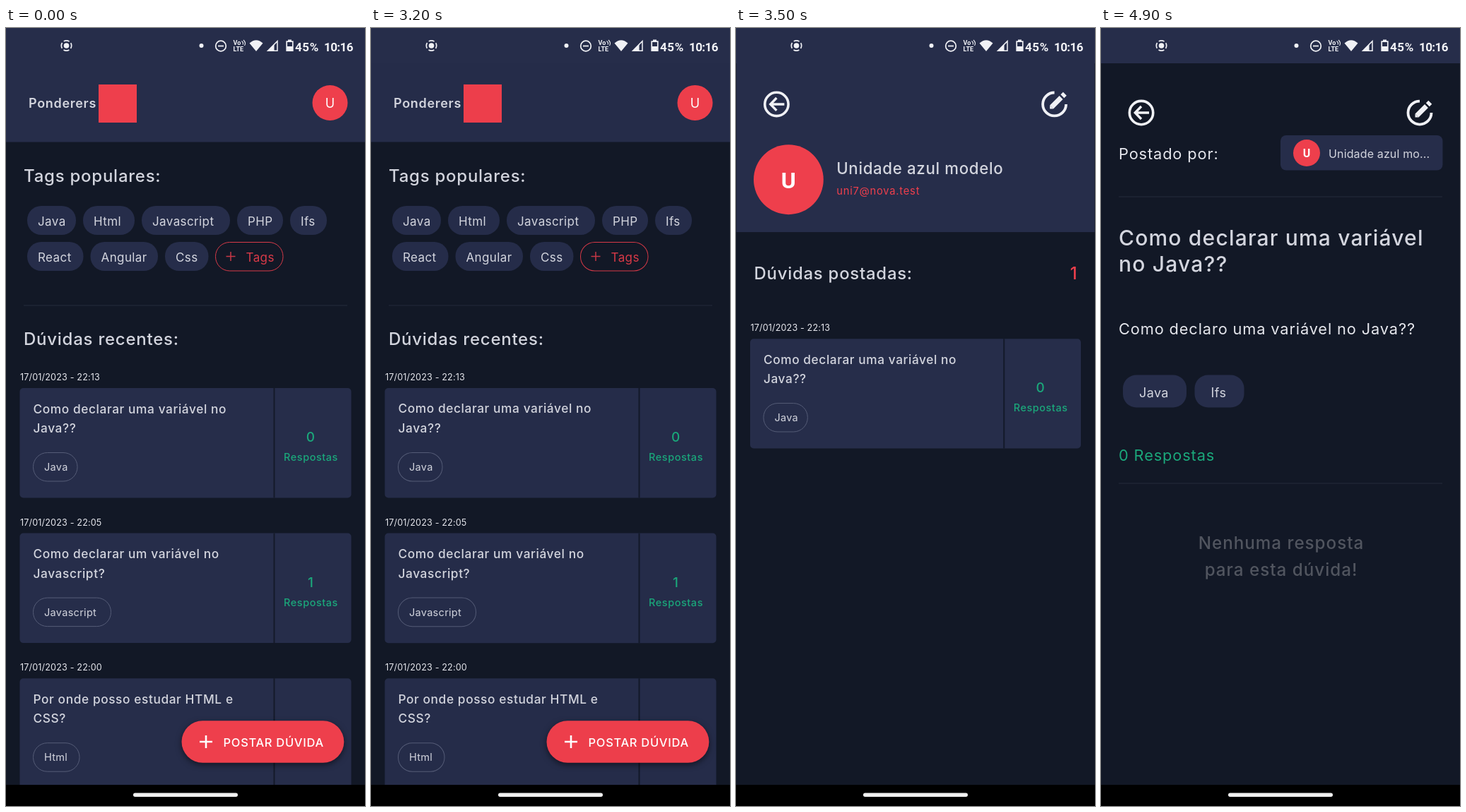
An HTML page that plays this animation: 508 by 1102 pixels, repeating every 5000 ms.

```html
<!DOCTYPE html>
<html lang="pt">
<head>
<meta charset="utf-8">
<title>Dúvidas</title>
<style>
html, body { margin: 0; width: 100%; height: 100%; overflow: hidden; background: #121826; }
svg { display: block; width: 508px; height: 1102px; font-family: Inter, "Open Sans", sans-serif; }
text { fill: #d3d5de; white-space: pre; }
.head { font-size: 24px; font-weight: 500; letter-spacing: .75px; }
.empty { font-size: 24.2px; font-weight: 500; letter-spacing: 1px; fill: #51555f; }
.brand { font-size: 18px; font-weight: 600; letter-spacing: .7px; }
.tag { font-size: 17px; letter-spacing: .4px; }
.big { font-size: 18px; letter-spacing: .4px; }
.date { font-size: 12.6px; letter-spacing: .15px; fill: #e6e7ed; }
.ask { font-size: 17.3px; font-weight: 500; letter-spacing: .6px; }
.small { font-size: 14.5px; letter-spacing: .3px; }
.count { font-size: 19px; font-weight: 500; fill: #1ba87b; }
.reply { font-size: 14.4px; font-weight: 500; letter-spacing: .6px; fill: #1ba87b; }
.post { font-size: 16.5px; font-weight: 500; letter-spacing: .7px; fill: #fff; }
.name { font-size: 22.3px; font-weight: 500; letter-spacing: .65px; }
.mail { font-size: 14.8px; letter-spacing: .75px; fill: #ee3f4c; }
.body { font-size: 21.8px; letter-spacing: .87px; fill: #e6e7ed; }
.title { font-size: 30px; font-weight: 500; letter-spacing: 1.2px; }
.chip { font-size: 16px; letter-spacing: .15px; }
.bar { font: 600 17px Roboto, sans-serif; fill: #f2f3f7; }
.red { fill: #ee3f4c; }
.green { fill: #1ba87b; }
.white { fill: #fff; }
#fab { filter: drop-shadow(0 3px 4px rgba(0, 0, 0, .5)); }
</style>
</head>
<body>
<svg id="stage" viewBox="0 0 508 1102"></svg>
<script>
const BG = '#121826', PANEL = '#262d4a', RED = '#ee3f4c', LIGHT = '#f0f1f5', LINE = '#252c3c';
const NAME = 'Unidade azul modelo';
const LOOP = 5000;

const text = (x, y, cls, s, more = '') => `<text x="${x}" y="${y}" class="${cls}" ${more}>${s}</text>`;
const mid = (x, y, cls, s, more = '') => text(x, y, cls, s, 'text-anchor="middle" ' + more);
const rect = (x, y, w, h, fill, r = 0, more = '') =>
  `<rect x="${x}" y="${y}" width="${w}" height="${h}" rx="${r}" fill="${fill}" ${more}/>`;
const circle = (x, y, r, fill, more = '') => `<circle cx="${x}" cy="${y}" r="${r}" fill="${fill}" ${more}/>`;
const path = (d, color, w, more = '') =>
  `<path d="${d}" fill="none" stroke="${color}" stroke-width="${w}" ${more}/>`;
const rule = y => rect(25, y, 458, 1, LINE);
const plus = (x, y, r, color, w) => path(`M${x - r} ${y}h${2 * r}M${x} ${y - r}v${2 * r}`, color, w);
const page = () => rect(0, 0, 508, 1102, BG);

function tag(x, y, w, label) {
  return rect(x, y, w, 41, PANEL, 20) + text(x + 15, y + 28, 'tag', label);
}

function card(y, date, lines, label, w, count) {
  return text(20, y - 11, 'date', date) +
    rect(19.5, y, 469, 155.5, PANEL, 5) +
    rect(378.5, y, 2, 155.5, '#141a2a') +
    lines.map((s, i) => text(38.5, y + 35.5 + i * 27.7, 'ask', s)).join('') +
    rect(38.5, y + 91.5, w, 40.5, PANEL, 20, 'stroke="#555c77" stroke-width="1"') +
    text(54, y + 117, 'small', label) +
    mid(431, y + 76, 'count', count) +
    mid(431.5, y + 103, 'reply', 'Respostas');
}

function icons(y) {
  return circle(57, y, 16.7, 'none', `stroke="${LIGHT}" stroke-width="3.6"`) +
    path(`M68 ${y}H49M57 ${y - 9}L48.3 ${y}L57 ${y + 9}`, LIGHT, 3.4) +
    path(`M451 ${y - 16.5}A16.5 16.5 0 1 0 467.5 ${y}`, LIGHT, 3.8) +
    path(`M447 ${y + 4}L460.5 ${y - 9.5}M462.3 ${y - 11.3}L465.8 ${y - 14.8}`, LIGHT, 7) +
    `<path d="M444.5 ${y + 6.5}v-5l5 5z" fill="${LIGHT}"/>`;
}

function initial(x, y, r, size) {
  return circle(x, y, r, RED) +
    mid(x, y + size * .37, 'white', 'U', `style="font:700 ${size}px Roboto,sans-serif"`);
}

const javaCard = y => card(y, '17/01/2023 - 22:13', ['Como declarar uma variável no', 'Java??'], 'Java', 62.5, 0);

const home = page() + rect(0, 0, 508, 161.5, PANEL) +
  text(32, 113, 'brand', 'Ponderers') +
  rect(131, 80, 54, 54, RED) +
  circle(458.5, 106, 25, RED) + mid(458.5, 113, 'white', 'U', 'font-size="18"') +
  text(25, 218, 'head', 'Tags populares:') +
  [[30, 252, 69, 'Java'], [109, 252, 73, 'Html'], [192, 252, 125, 'Javascript'], [327, 252, 65, 'PHP'],
   [402, 252, 52, 'Ifs'], [30, 303, 79.5, 'React'], [119.5, 303, 95.5, 'Angular'], [225, 303, 61.5, 'Css']]
    .map(a => tag(...a)).join('') +
  rect(296.5, 303.5, 95.5, 40.5, 'none', 20, 'stroke="#d83a48" stroke-width="1"') +
  plus(318, 323.5, 6.5, '#c83847', 1.5) + text(339.5, 331, 'tag', 'Tags', 'style="fill:#d83a48"') +
  rule(392.5) +
  text(25, 449, 'head', 'Dúvidas recentes:') +
  javaCard(510) +
  card(715.6, '17/01/2023 - 22:05', ['Como declarar um variável no', 'Javascript?'], 'Javascript', 110, 1) +
  card(921.2, '17/01/2023 - 22:00', ['Por onde posso estudar HTML e', 'CSS?'], 'Html', 65.5, 1) +
  `<g id="fab">${rect(248.5, 981.3, 229.8, 59.4, RED, 29.7)}</g>` +
  plus(283, 1011, 9, '#fff', 2.6) + text(307.5, 1018, 'post', 'POSTAR DÚVIDA');

const profile = page() + rect(0, 0, 508, 288.5, PANEL) + icons(107) +
  initial(74, 214, 49.5, 32) +
  text(142, 206, 'name', NAME) + text(142, 235, 'mail', 'uni7@nova.test') +
  text(25, 356, 'head', 'Dúvidas postadas:') +
  `<g id="empty">${text(484, 356, 'head red', '0', 'text-anchor="end"')}${mid(254, 471, 'empty', 'Nenhuma dúvida postada')}</g>` +
  `<g id="posted">${text(484, 356, 'head red', '1', 'text-anchor="end"')}<g id="press">${javaCard(440)}</g></g>`;

const detail = page() + icons(120) +
  text(25, 186, 'body', 'Postado por:') +
  rect(254, 152, 229.5, 49.5, PANEL, 8) + initial(291, 177, 19, 16) +
  text(322, 184, 'chip', NAME.slice(0, 15) + '...') +
  rule(238.5) +
  text(25, 308, 'title', 'Como declarar uma variável') + text(25, 345, 'title', 'no Java??') +
  text(25, 434.5, 'body', 'Como declaro uma variável no Java??') +
  rect(31, 491.5, 90, 46, PANEL, 19) + text(54, 523, 'big', 'Java') +
  rect(132.5, 491.5, 70, 46, PANEL, 19) + text(155.5, 523, 'big', 'Ifs') +
  text(25, 613, 'body green', '0 Respostas') +
  rule(644.5) +
  mid(255, 738, 'empty', 'Nenhuma resposta') + mid(255, 776, 'empty', 'para esta dúvida!');

const status = rect(0, 0, 508, 50, PANEL) +
  circle(85.5, 25, 3.8, LIGHT) +
  circle(85.5, 25, 7.2, 'none', `stroke="${LIGHT}" stroke-width="1.7" stroke-dasharray="8.3 3" stroke-dashoffset="4.15"`) +
  circle(276.5, 25, 3, LIGHT) +
  circle(304, 25.5, 7.3, 'none', `stroke="${LIGHT}" stroke-width="1.7"`) + path('M300 25.5h8', LIGHT, 1.8) +
  text(321.5, 24, 'bar', 'Vo', 'style="font-size:9px;font-weight:700"') +
  text(321.5, 33, 'bar', 'LTE', 'style="font-size:9px;font-weight:700"') +
  path('M333.5 18.5q3 2.5 1.5 5M336 17q4 4 1.5 8', LIGHT, 1.1) +
  `<path d="M344.5 21.5Q354 13 363.5 21.5L354 33Z" fill="${LIGHT}"/>` +
  path('M370.5 32.2L384 18.6V32.2Z', LIGHT, 1.5) +
  `<path d="M370 32.7L379.5 23.5V32.7Z" fill="${LIGHT}"/>` +
  path('M397.2 19.2h8.6v13h-8.6z', LIGHT, 1.7) + rect(399, 16.5, 5, 2.5, LIGHT) + rect(397, 26, 9, 6, LIGHT) +
  text(409, 32.5, 'bar', '45%', 'letter-spacing=".6"') +
  text(450, 32.5, 'bar', '10:16', 'letter-spacing="-.6"');

const nav = rect(0, 1072, 508, 30, '#000') + rect(180, 1083.5, 148, 5.5, '#f0f0f0', 2.7);

document.getElementById('stage').innerHTML =
  '<clipPath id="view"><rect y="50" width="508" height="1022"/></clipPath>' +
  rect(0, 0, 508, 1102, BG) + '<g clip-path="url(#view)">' +
  [home, profile, detail].map((s, i) => `<g id="page${i}">${s}</g>`).join('') + '</g>' + status + nav;

const $ = id => document.getElementById(id);
const pages = [0, 1, 2].map(i => $('page' + i));
const pieces = [...$('press').children];
const clamp = v => Math.max(0, Math.min(1, v));
const quad = u => u < .5 ? 2 * u * u : 1 - 2 * (1 - u) * (1 - u);
const show = (el, on) => { el.style.display = on ? '' : 'none'; };

const bez = (u, a, b, c, d) => {
  const v = 1 - u;
  return a * v * v * v + 3 * b * u * v * v + 3 * c * u * u * v + d * u * u * u;
};

// Fast out, extra slow in: two joined cubic curves.
function ease(x) {
  if (x <= 0 || x >= 1) return clamp(x);
  const [xs, ys] = x < 1 / 6
    ? [[0, .05, .133333, 1 / 6], [0, 0, .06, .4]]
    : [[1 / 6, .208333, .25, 1], [.4, .82, 1, 1]];
  let lo = 0, hi = 1;
  for (let i = 0; i < 30; i++) {
    const m = (lo + hi) / 2;
    if (bez(m, ...xs) < x) lo = m; else hi = m;
  }
  return bez(lo, ...ys);
}

const OPENS = [3197, 4490], SPAN = 440, FADE_AT = 99, FADE = 83;
const PRESS = 4315, RELEASE = 4465, LOADED = 3450;

// The opening page grows and fades in; the one below grows on and dims.
function draw(t) {
  pages.forEach((el, i) => {
    const opened = i ? t - OPENS[i - 1] : Infinity;
    const left = i < 2 ? t - OPENS[i] : -1;
    const scale = .85 + .15 * ease(opened / SPAN) + .15 * ease(left / SPAN);
    show(el, opened > FADE_AT && left < FADE_AT + FADE);
    el.setAttribute('opacity', clamp((opened - FADE_AT) / FADE) * (1 - .5 * clamp(left / SPAN)));
    el.setAttribute('transform', `translate(254 561) scale(${scale}) translate(-254 -561)`);
  });
  show($('empty'), t < LOADED);
  show($('posted'), t >= LOADED);
  const dim = quad(clamp((t - PRESS) / 150)) - quad(clamp((t - RELEASE) / 250));
  pieces.forEach(el => el.setAttribute('opacity', 1 - .8 * dim));
}

const start = performance.now();
function tick() {
  draw((performance.now() - start) % LOOP);
  requestAnimationFrame(tick);
}
tick();
</script>
</body>
</html>
```
